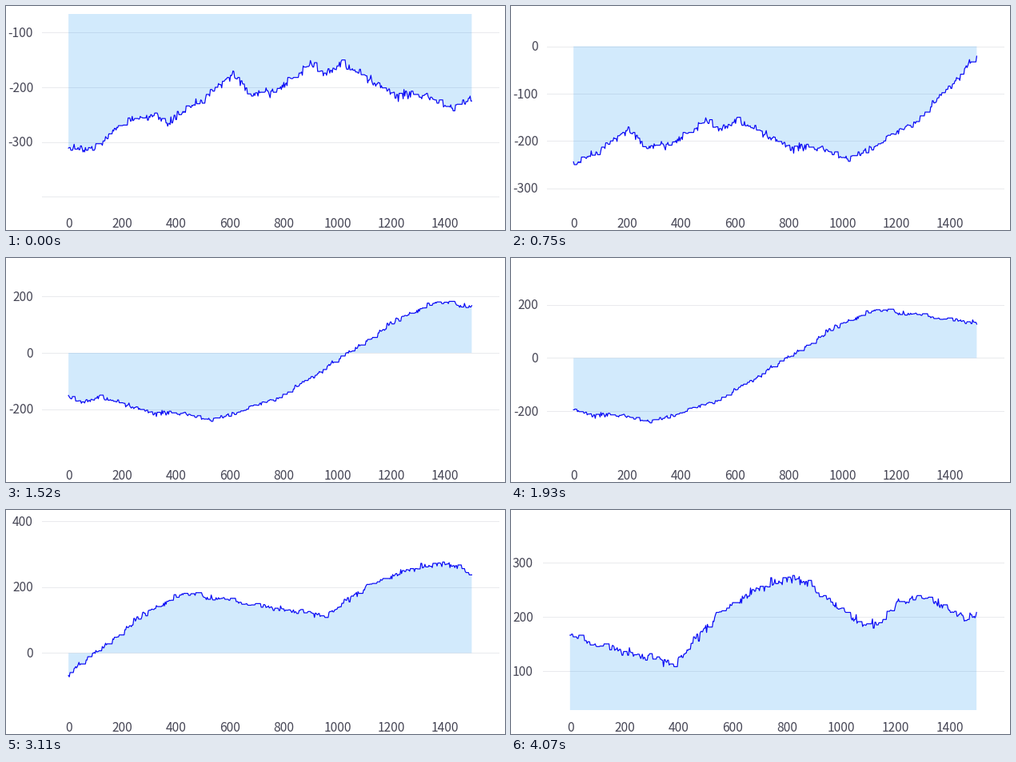
Animation of 624x281 px, one loop 4.14 s. Source, as a matplotlib script:

```python
import numpy as np
import matplotlib.pyplot as plt
from matplotlib.animation import FuncAnimation

W, H, DPI = 624, 281, 100
LOOP, INTERVAL = 4140, 20
STEP = 69            # ms between data updates
SPEED = 40.9         # samples scrolled per update
TOP, BOTTOM, RIGHT = 10, 251, 616
SPAN, DX = 1500, 3
PX = 72 / DPI
FONT = dict(family="Noto Sans CJK JP", size=15.6 * PX, color="#464655")

# Turning points of the trend: sample, value
TURNS = [
    (0, -311), (110, -308), (200, -264), (320, -249), (365, -263),
    (500, -220), (620, -176), (680, -213), (790, -200), (900, -158),
    (960, -175), (1020, -156), (1225, -218), (1290, -210), (1430, -235),
    (1520, -215), (1600, -180), (1680, -160), (1790, -95), (2130, 122),
    (2270, 183), (2390, 166), (2700, 124), (2800, 112), (2960, 208),
    (3080, 246), (3190, 269), (3260, 269), (3480, 189), (3560, 189),
    (3615, 228), (3730, 236), (3860, 198), (3930, 202),
]

# Axis zoom poses: update, lower limit, upper limit
ZOOM = [
    (0, -417, -66), (7, -344, -15), (16, -357, 212), (28, -375, 345),
    (39, -313, 361), (50, -9, 386), (59, 28, 382),
]


def make_walk():
    """Noisy trend that rests on short plateaus."""
    rng = np.random.default_rng(7)
    s = np.arange(0, TURNS[-1][0] + 1, DX)
    walk = np.interp(s, *zip(*TURNS)) + rng.normal(0, 4.5, s.size)
    moves = rng.random(s.size) < 0.5
    held = np.maximum.accumulate(np.where(moves, np.arange(s.size), 0))
    return np.round(walk[held])


WALK = make_walk()
XS = np.arange(0, SPAN + 1, DX)


def window(n):
    start = round(n * SPEED / DX)
    return WALK[start:start + XS.size]


def pads(n, lo, hi):
    """Space below and above the data, relative to its range."""
    v = window(n)
    return (v.min() - lo) / np.ptp(v), (hi - v.max()) / np.ptp(v)


ZOOM_AT = [pose[0] for pose in ZOOM]
BELOW, ABOVE = zip(*(pads(*pose) for pose in ZOOM))


def limits(n):
    v = window(n)
    return (v.min() - np.ptp(v) * np.interp(n, ZOOM_AT, BELOW),
            v.max() + np.ptp(v) * np.interp(n, ZOOM_AT, ABOVE))


def to_y(v, lo, hi):
    return TOP + (hi - v) / (hi - lo) * (BOTTOM - TOP)


def to_x(v, left):
    return left + (v + 100) / (SPAN + 200) * (RIGHT - left)


def tick_alpha(v, n):
    if v % 100:
        return np.interp(n, [1, 3, 6, 7, 9], [0, 1, 1, 0.33, 0])
    if v % 200:
        return np.interp(n, [13, 16, 18, 45, 48], [1, 0.2, 0, 0, 1])
    return 1.0


fig = plt.figure(figsize=(W / DPI, H / DPI), dpi=DPI, facecolor="white")
ax = fig.add_axes([0, 0, 1, 1])
ax.set_xlim(0, W)
ax.set_ylim(H, 0)
ax.axis("off")

ticks = {}
for value in range(-450, 451, 50):
    grid, = ax.plot([], [], color="#e9eaed", lw=PX, zorder=1)
    text = ax.text(0, 0, str(value), ha="right", va="baseline", **FONT)
    ticks[value] = grid, text

x_labels = {v: ax.text(0, 278.2, str(v), ha="center", va="baseline", **FONT)
            for v in range(0, SPAN, 200)}
area, = ax.fill([0, 0, 0], [0, 0, 0], color="#2196f3", alpha=0.2, lw=0, zorder=2)
line, = ax.plot([], [], color="#0808f5", lw=1.2 * PX, zorder=3)


def draw_tick(value, n, lo, hi, left, edge):
    grid, text = ticks[value]
    alpha = tick_alpha(value, n)
    if value % 200 == 100 and n < 40:
        # fading labels run ahead to the next scale
        lo, hi = lo - 6 * (1 - alpha), hi + 26 * (1 - alpha)
    y = to_y(value, lo, hi)

    grid.set_data([left, RIGHT], [y, y])
    grid.set_alpha(alpha ** 2)
    grid.set_visible(alpha > 0 and TOP <= y <= BOTTOM)

    floor = 262 if value % 100 else 235
    if y < TOP:
        alpha *= np.clip((y + 8) / 18, 0, 1) if n < 45 else 0
    text.set_position((edge, y + 5.7))
    text.set_alpha(alpha)
    text.set_visible(alpha > 0 and y <= floor)


def draw(i):
    n = (i * INTERVAL + 12) // STEP
    lo, hi = limits(n)
    left = np.interp(n, [45, 48, 59], [44.5, 40.7, 39.9])
    edge = np.interp(n, [45, 48], [34, 27.8])

    for value in ticks:
        draw_tick(value, n, lo, hi, left, edge)
    for v, label in x_labels.items():
        label.set_x(to_x(v, left) + 0.4)

    x, y = to_x(XS, left), to_y(window(n), lo, hi)
    base = np.clip(to_y(0, lo, hi), TOP, BOTTOM)
    area.set_xy(np.column_stack([np.r_[x[0], x, x[-1]], np.r_[base, y, base]]))
    line.set_data(x, y)
    return []


anim = FuncAnimation(fig, draw, frames=LOOP // INTERVAL, interval=INTERVAL,
                     init_func=lambda: draw(0), repeat=True, repeat_delay=0)
plt.show()
```
